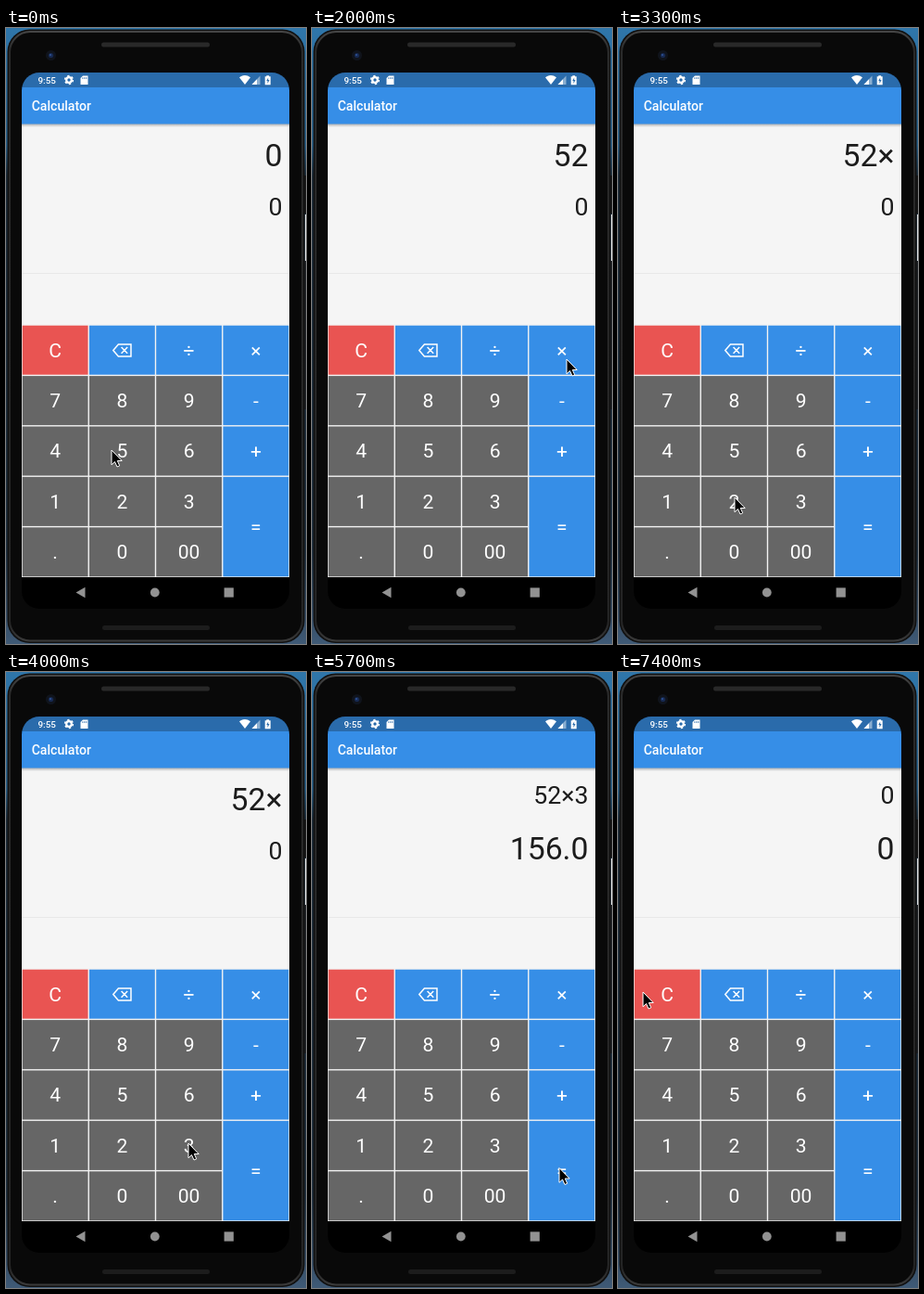
These frames come from a looping animation (324 px wide and 664 px high, 7500 ms). An HTML page:

```html
<!DOCTYPE html>
<html lang="en">
<head>
<meta charset="utf-8">
<title>Calculator</title>
<style>
  html, body { margin: 0; width: 100%; height: 100%; overflow: hidden; background: #111; }
  #stage { display: block; width: 324px; height: 664px; }
  text { font-family: Roboto, Arial, sans-serif; white-space: pre; }
  .key { font-size: 21.1px; fill: #fff; text-anchor: middle; }
  .out { fill: #1c1c1c; text-anchor: end; }
</style>
</head>
<body>
<svg id="stage" viewBox="0 0 324 664" xmlns="http://www.w3.org/2000/svg">
  <defs>
    <linearGradient id="desk" x1="0" y1="0" x2="0" y2="1">
      <stop offset="0" stop-color="#2f76aa"/>
      <stop offset=".19" stop-color="#275f88"/>
      <stop offset=".24" stop-color="#1b2a37"/>
      <stop offset=".85" stop-color="#1e2f3f"/>
      <stop offset="1" stop-color="#3f5a76"/>
    </linearGradient>
    <linearGradient id="rim" x1="0" y1="0" x2="0" y2="1">
      <stop offset="0" stop-color="#454545"/>
      <stop offset=".03" stop-color="#2a2a2a"/>
      <stop offset=".97" stop-color="#242424"/>
      <stop offset="1" stop-color="#3a3a3a"/>
    </linearGradient>
    <linearGradient id="shade" x1="0" y1="0" x2="0" y2="1">
      <stop offset="0" stop-color="#000" stop-opacity=".3"/>
      <stop offset="1" stop-color="#000" stop-opacity="0"/>
    </linearGradient>
    <clipPath id="glass"><rect x="17" y="48" width="289" height="578" rx="19"/></clipPath>
  </defs>

  <!-- desktop and phone -->
  <rect width="324" height="664" fill="url(#desk)"/>
  <rect x="321" y="159" width="3" height="41" fill="#161616"/>
  <rect x="323" y="201" width="1" height="50" fill="#dcdfe2"/>
  <rect x="321" y="251" width="3" height="160" fill="#1c1f23"/>
  <rect x="1.5" y="1.5" width="321" height="661.5" rx="24" fill="#101010"/>
  <rect x="4" y="4" width="316" height="656.5" rx="22" fill="#090909" stroke="url(#rim)" stroke-width="2"/>
  <rect x="103" y="15.5" width="117" height="5" rx="2.5" fill="#292929"/>
  <rect x="104" y="644" width="116" height="5" rx="2.5" fill="#1c1c1c"/>
  <circle cx="48.5" cy="29.5" r="5.5" fill="#10141c"/>
  <circle cx="48.5" cy="29.5" r="2.6" fill="#172a52"/>
  <circle cx="48" cy="29" r="1" fill="#31549a"/>

  <g clip-path="url(#glass)">
    <rect x="17" y="48" width="289" height="578" fill="#000"/>
    <rect x="17" y="103" width="289" height="489" fill="#f5f5f5"/>
    <rect x="17" y="103" width="289" height="4" fill="url(#shade)"/>
    <rect x="17" y="48" width="289" height="16.5" fill="#2a6bab"/>
    <rect x="17" y="64" width="289" height="39.5" fill="#368ee7"/>
    <rect x="17" y="264" width="289" height="1" fill="#e8e8e8"/>
    <rect x="17" y="319.3" width="289" height="272.7" fill="#f3f3f3"/>

    <!-- status bar -->
    <g fill="#fff">
      <text x="34.5" y="59.6" font-size="9.9" font-weight="500">9:55</text>
      <circle cx="68" cy="56" r="2.8" fill="none" stroke="#fff" stroke-width="2.2"/>
      <circle cx="68" cy="56" r="4.4" fill="none" stroke="#fff" stroke-width="1.5" stroke-dasharray="2.3 2.31"/>
      <path d="M83 51.5h5.5v9.5h-8v-7z"/>
      <path d="M82.8 53.2v1.8M84.8 53v2M86.8 53v2" stroke="#2a6bab" stroke-width=".8"/>
      <path d="M252 53.2Q258 49 264 53.2L258 61z"/>
      <path d="M274.5 51.5v9.5h-9z" opacity=".45"/>
      <path d="M271 55.2v5.8h-5.5z"/>
      <path d="M281.3 51.3h2.8v1h1.6v9h-6v-9h1.6z"/>
      <path d="M283.2 53.5l-1.9 3.6h1.2v2.8l2-3.8h-1.3z" fill="#2a6bab"/>
    </g>
    <text x="27.7" y="89.2" font-size="14.06" font-weight="500" fill="#fff">Calculator</text>

    <text id="sum" class="out" x="298.5"></text>
    <text id="result" class="out" x="298.5"></text>

    <g id="keys"></g>
    <svg id="ripple" overflow="hidden">
      <rect width="100%" height="100%"/>
      <circle/>
    </svg>
    <g id="labels"></g>

    <!-- navigation bar -->
    <g fill="#929292">
      <path d="M85.5 602.8v11.4L75.5 608.5z"/>
      <circle cx="160.8" cy="608.5" r="4.9"/>
      <rect x="235.6" y="603.4" width="10.2" height="10.2"/>
    </g>
  </g>

  <path id="cursor" d="M0 0V15.8L3.5 12.5L6 18L8.7 16.8L6.3 11.5H11.2Z"
        fill="#000" stroke="#fff" stroke-width="1" stroke-linejoin="round"/>
</svg>

<script>
const NS = 'http://www.w3.org/2000/svg';
const $ = id => document.getElementById(id);
const set = (node, attrs) => {
  for (const k in attrs) node.setAttribute(k, attrs[k]);
  return node;
};
const add = (parent, tag, attrs) => parent.appendChild(set(document.createElementNS(NS, tag), attrs));

const LOOP = 7500, STEP = 100, RIPPLE = 400;
const COL = 72.25, ROW = 54.4, LEFT = 17, TOP = 320, EDGE = .7;
const BLUE = '#368ee7', RED = '#e95452', GREY = '#666';

const rows = [['C', '⌫', '÷', '×'], ['7', '8', '9', '-'], ['4', '5', '6', '+'],
              ['1', '2', '3', '='], ['.', '0', '00']];
const boxes = {};

rows.forEach((row, r) => row.forEach((name, c) => {
  const box = { x: LEFT + c * COL + EDGE, y: TOP + r * ROW + EDGE, width: COL - 2 * EDGE,
                height: (name === '=' ? 2 : 1) * ROW - 2 * EDGE };
  boxes[name] = box;
  const fill = name === 'C' ? RED : c === 3 || r === 0 ? BLUE : GREY;
  add($('keys'), 'rect', { ...box, fill });
  const x = box.x + box.width / 2, y = box.y + box.height / 2;
  if (name === '⌫') {
    add($('labels'), 'path', {
      d: 'M-9.6 .2L-4 -6.3H9.6V6.7H-4ZM-.8 -3.2L5.8 3.6M5.8 -3.2L-.8 3.6',
      transform: `translate(${x} ${y})`, fill: 'none', stroke: '#fff', 'stroke-width': 1.5
    });
  } else {
    add($('labels'), 'text', { x, y: y + 7.4, class: 'key' }).textContent = name;
  }
}));

// Pointer stops: time, x, y
const path = [
  [0, 114, 455], [400, 114, 455], [700, 122, 492], [1400, 122, 492],
  [2000, 275, 357], [2600, 275, 357], [3200, 126, 506], [3400, 126, 506],
  [3900, 197, 508], [4300, 197, 508], [4700, 267, 534.5], [5900, 267, 534.5],
  [6400, 121, 357], [6700, 27, 345], [LOOP, 27, 345]
];

// Key presses: time, key
const presses = [[100, '5'], [900, '2'], [2200, '×'], [4100, '3'], [5000, '='], [6900, 'C']];

// Display: time, sum, result, result emphasised
const screens = [
  [0, '0', '0', false], [200, '5', '0', false], [1000, '52', '0', false],
  [2300, '52×', '0', false], [4200, '52×3', '0', false],
  [5100, '52×3', '156.0', true], [7000, '0', '0', true]
];

const latest = (list, t) => list.filter(item => item[0] <= t).pop();
const ease = u => u * u * (3 - 2 * u);

function pointerAt(t) {
  const i = path.findIndex(p => p[0] > t);
  const [t0, x0, y0] = path[i - 1], [t1, x1, y1] = path[i];
  const k = ease((t - t0) / (t1 - t0));
  return [x0 + (x1 - x0) * k, y0 + (y1 - y0) * k];
}

function drawDisplay(t) {
  const [, sum, result, done] = latest(screens, t);
  $('sum').textContent = sum;
  $('result').textContent = result;
  set($('sum'), { 'font-size': done ? 26.7 : 33.75, y: done ? 142.2 : 148.8 });
  set($('result'), { 'font-size': done ? 33.75 : 26.7, y: done ? 201.8 : 202.2 });
}

function drawRipple(t) {
  const press = latest(presses, t);
  const age = press ? t - press[0] : RIPPLE;
  $('ripple').style.display = age < RIPPLE ? '' : 'none';
  if (age >= RIPPLE) return;
  const box = boxes[press[1]];
  const [x, y] = pointerAt(press[0]);
  const fade = Math.min(1, (RIPPLE - age) / 300);
  set($('ripple'), box);
  const [glow, splash] = $('ripple').children;
  set(glow, { opacity: .06 * fade });
  set(splash, { cx: x - box.x, cy: y - box.y, r: 12 + age * .3, opacity: .07 * fade });
}

function frame(now) {
  const t = Math.floor(now % LOOP / STEP) * STEP;
  drawDisplay(t);
  drawRipple(t);
  set($('cursor'), { transform: `translate(${pointerAt(t)})` });
  requestAnimationFrame(frame);
}
frame(performance.now());
</script>
</body>
</html>
```
